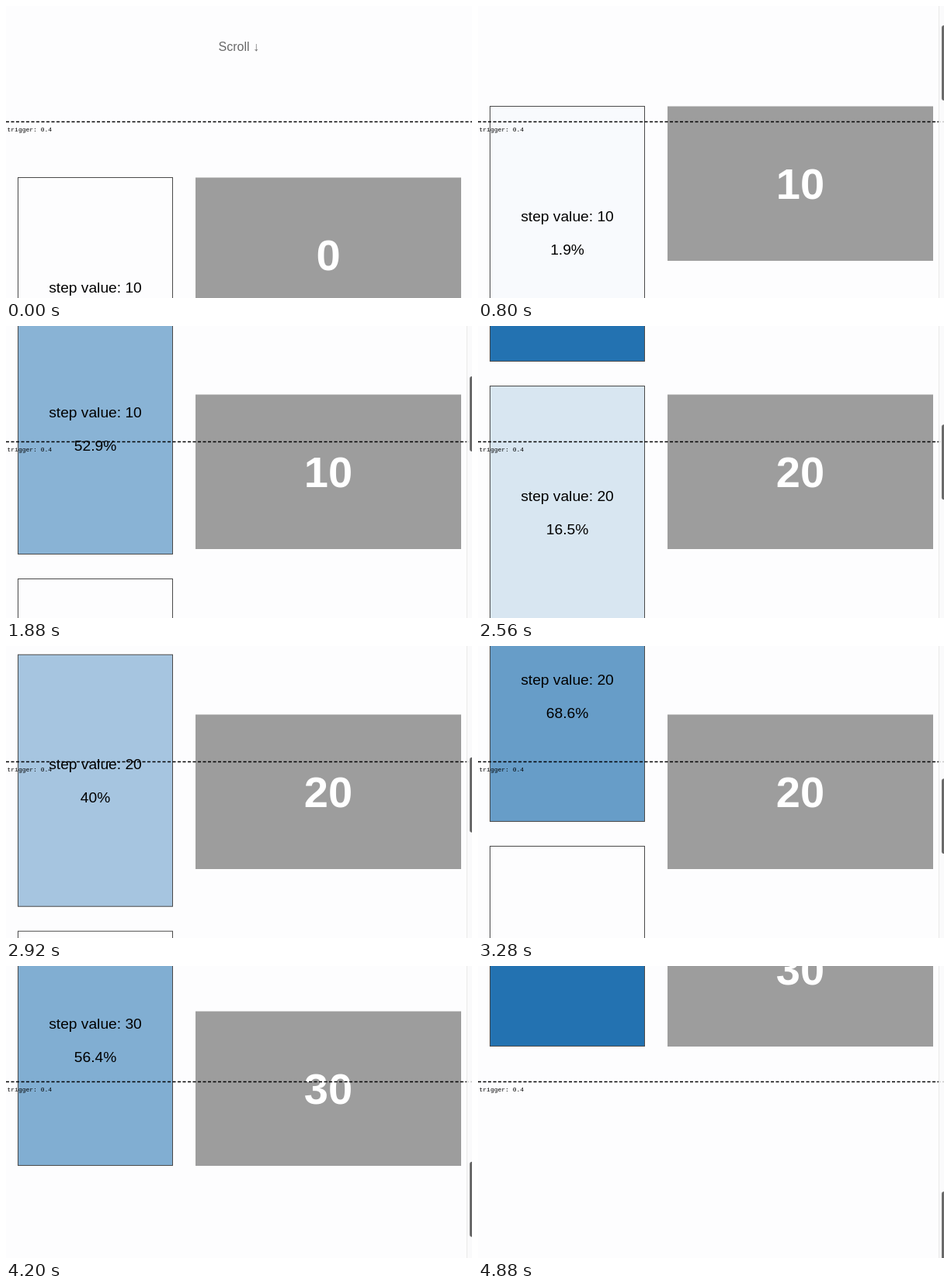
Animation, 600 px wide and 377 px high, one loop 5 s. Source, as an HTML page:

```html
<!DOCTYPE html>
<html lang="en">
<head>
<meta charset="utf-8">
<title>Scroll progress</title>
<style>
  html, body { margin: 0; width: 100%; height: 100%; overflow: hidden; background: #fdfdfe; }
  svg { display: block; width: 100vw; height: 100vh; font-family: "Liberation Sans", Arial, sans-serif; }
  .step { font-size: 19.2px; text-anchor: middle; }
  .step rect { stroke: #4a4a4a; }
  .big { font-size: 56px; font-weight: bold; text-anchor: middle; fill: #fff; }
  .label { font: 8px "Liberation Mono", "Courier New", monospace; }
</style>
</head>
<body>
<svg viewBox="0 0 600 377">
  <rect width="600" height="377" fill="#fdfdfe"/>
  <g id="page">
    <text x="273.5" y="58" font-size="16" fill="#696969">Scroll ↓</text>
    <g id="steps"></g>
  </g>
  <g id="graphic">
    <rect x="244" width="342" height="199.5" fill="#9d9d9d"/>
    <text class="big" id="value" x="415" y="119.7"></text>
  </g>
  <path d="M0 149.5H600" stroke="#000" stroke-width="1.4" stroke-dasharray="4 2.5"/>
  <text class="label" x="1.5" y="161.5">trigger: 0.4</text>
  <g id="bar">
    <rect x="593" width="7" height="377" fill="#fafafa" fill-opacity=".8"/>
    <path d="M593.5 0V377" stroke="#e9e9e9"/>
    <rect id="thumb" x="597" width="8" height="97" rx="3" fill="#6a6a6a"/>
  </g>
</svg>
<script>
const LOOP = 5000, FRAME = 40;
const TOP = 221.5, HEIGHT = 325, PITCH = 357;
const TRIGGER = 149.5, STICKY = 88.5, END = 1061.5;
const LAG = 60; // ms the progress reading trails the scroll

// time, scroll offset, speed in px per ms
const keys = [
  [480, 0, 0], [800, 92, .222], [1080, 138, .08], [1400, 150, .03],
  [1600, 190, .2], [1880, 252, .127], [2560, 501, .298], [2900, 565, .1],
  [3280, 677, .408], [3800, 815, .2], [4200, 1003, .553], [4400, 1113, .4],
  [4720, 1157, 0]
];

const $ = id => document.getElementById(id);

function add(parent, tag, attrs, text = '') {
  const el = document.createElementNS('http://www.w3.org/2000/svg', tag);
  for (const k in attrs) el.setAttribute(k, attrs[k]);
  el.textContent = text;
  return parent.appendChild(el);
}

const steps = [10, 20, 30].map((value, i) => {
  const y = TOP + i * PITCH;
  const g = add($('steps'), 'g', { class: 'step' });
  const box = add(g, 'rect', { x: 15.5, y, width: 199, height: HEIGHT });
  add(g, 'text', { x: 115, y: y + 148 }, 'step value: ' + value);
  const percent = add(g, 'text', { x: 115, y: y + 191 });
  return { value, start: y + .5 - TRIGGER, box, percent };
});

// Cubic Hermite interpolation: returns [offset, speed]
function scrollAt(t) {
  const last = keys[keys.length - 1];
  if (t <= keys[0][0]) return [0, 0];
  if (t >= last[0]) return [last[1], 0];
  const i = keys.findIndex(k => k[0] > t);
  const [t0, a, va] = keys[i - 1], [t1, b, vb] = keys[i];
  const d = t1 - t0, u = (t - t0) / d;
  const c2 = 3 * (b - a) - d * (2 * va + vb);
  const c3 = 2 * (a - b) + d * (va + vb);
  return [
    a + u * (d * va + u * (c2 + u * c3)),
    va + u * (2 * c2 + 3 * c3 * u) / d
  ];
}

function draw(time) {
  const t = Math.floor(time / FRAME) * FRAME;
  const [offset, speed] = scrollAt(t);
  const read = offset - LAG * speed;
  const move = (id, y) => $(id).setAttribute('transform', `translate(0 ${y})`);

  let current = 0;
  for (const s of steps) if (read > s.start) current = s.value;
  for (const s of steps) {
    const p = Math.min(1, Math.max(0, (read - s.start) / HEIGHT));
    s.box.setAttribute('fill', `rgba(35,114,177,${p})`);
    s.percent.textContent = s.value === current ? Math.round(p * 1000) / 10 + '%' : '';
  }
  $('value').textContent = current;

  move('page', -offset);
  move('graphic', Math.min(Math.max(TOP - offset, STICKY), END - offset));
  move('thumb', 2 + offset / 4);
  $('bar').setAttribute('visibility', t < 520 ? 'hidden' : 'visible');
}

const began = performance.now();
function tick() {
  draw((performance.now() - began) % LOOP);
  requestAnimationFrame(tick);
}
tick();
</script>
</body>
</html>
```
